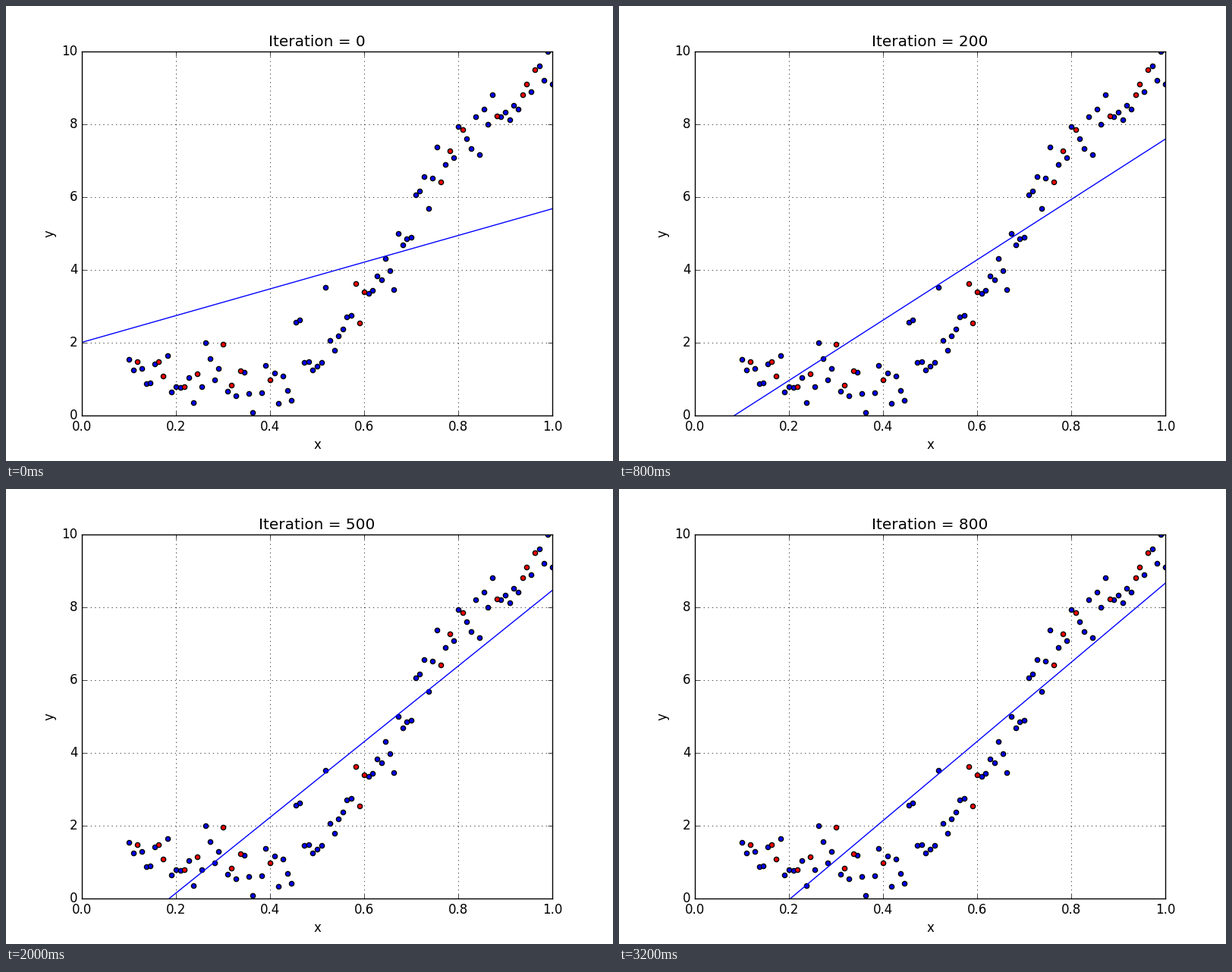
A matplotlib script for the animation above (6.2 s loop, 800 by 600 pixels).

```python
import numpy as np
import matplotlib.pyplot as plt
from matplotlib.animation import FuncAnimation

plt.style.use("classic")
plt.rcParams["font.family"] = "DejaVu Sans"

STEP = 50          # iterations per frame
LAST = 800         # iteration on which the fit holds
FRAMES = 31
INTERVAL = 200
DECAY = 0.00496    # convergence rate per iteration

START = np.array([2.01, 3.67])     # intercept, slope
LIMIT = np.array([-2.29, 11.01])

x = np.linspace(0.1, 1, 100)
y = np.array([
    1.54, 1.25, 1.48, 1.29, 0.88, 0.90, 1.42, 1.48, 1.08, 1.65,
    0.65, 0.79, 0.77, 0.79, 1.04, 0.35, 1.15, 0.79, 2.00, 1.56,
    0.98, 1.29, 1.96, 0.67, 0.83, 0.54, 1.23, 1.19, 0.60, 0.08,
    -0.4, 0.62, 1.38, 0.98, 1.17, 0.33, 1.08, 0.69, 0.42, 2.56,
    2.62, 1.46, 1.48, 1.25, 1.35, 1.46, 3.52, 2.06, 1.79, 2.19,
    2.38, 2.71, 2.75, 3.62, 2.54, 3.40, 3.35, 3.44, 3.83, 3.73,
    4.31, 3.98, 3.46, 5.00, 4.69, 4.85, 4.90, 6.06, 6.17, 6.56,
    5.69, 6.52, 7.38, 6.42, 6.90, 7.27, 7.08, 7.94, 7.85, 7.60,
    7.33, 8.21, 7.17, 8.42, 8.00, 8.81, 8.23, 8.21, 8.33, 8.12,
    8.52, 8.42, 8.81, 9.10, 8.90, 9.50, 9.60, 9.21, 10.0, 9.10,
])
test = np.zeros(len(x), dtype=bool)
test[[2, 7, 8, 13, 16, 22, 24, 26, 30, 33,
      53, 54, 55, 73, 75, 78, 86, 92, 93, 95]] = True

fig = plt.figure(figsize=(8, 6), dpi=100, facecolor="white")
ax = fig.add_subplot()
for mask, color in ((~test, "blue"), (test, "red")):
    ax.scatter(x[mask], y[mask], s=20, c=color, edgecolors="black", linewidths=1)

ends = np.array([0.0, 1.0])
line, = ax.plot(ends, ends, color="blue", lw=1)
title = ax.set_title("")
ax.set(xlim=(0, 1), ylim=(0, 10), xlabel="x", ylabel="y")
ax.grid(True)


def update(frame):
    iteration = min(frame * STEP, LAST)
    a, b = LIMIT + (START - LIMIT) * np.exp(-DECAY * iteration)
    line.set_ydata(a + b * ends)
    title.set_text(f"Iteration = {iteration}")
    return line, title


anim = FuncAnimation(fig, update, frames=FRAMES, interval=INTERVAL,
                     repeat=True, repeat_delay=0, blit=False)
plt.show()
```
